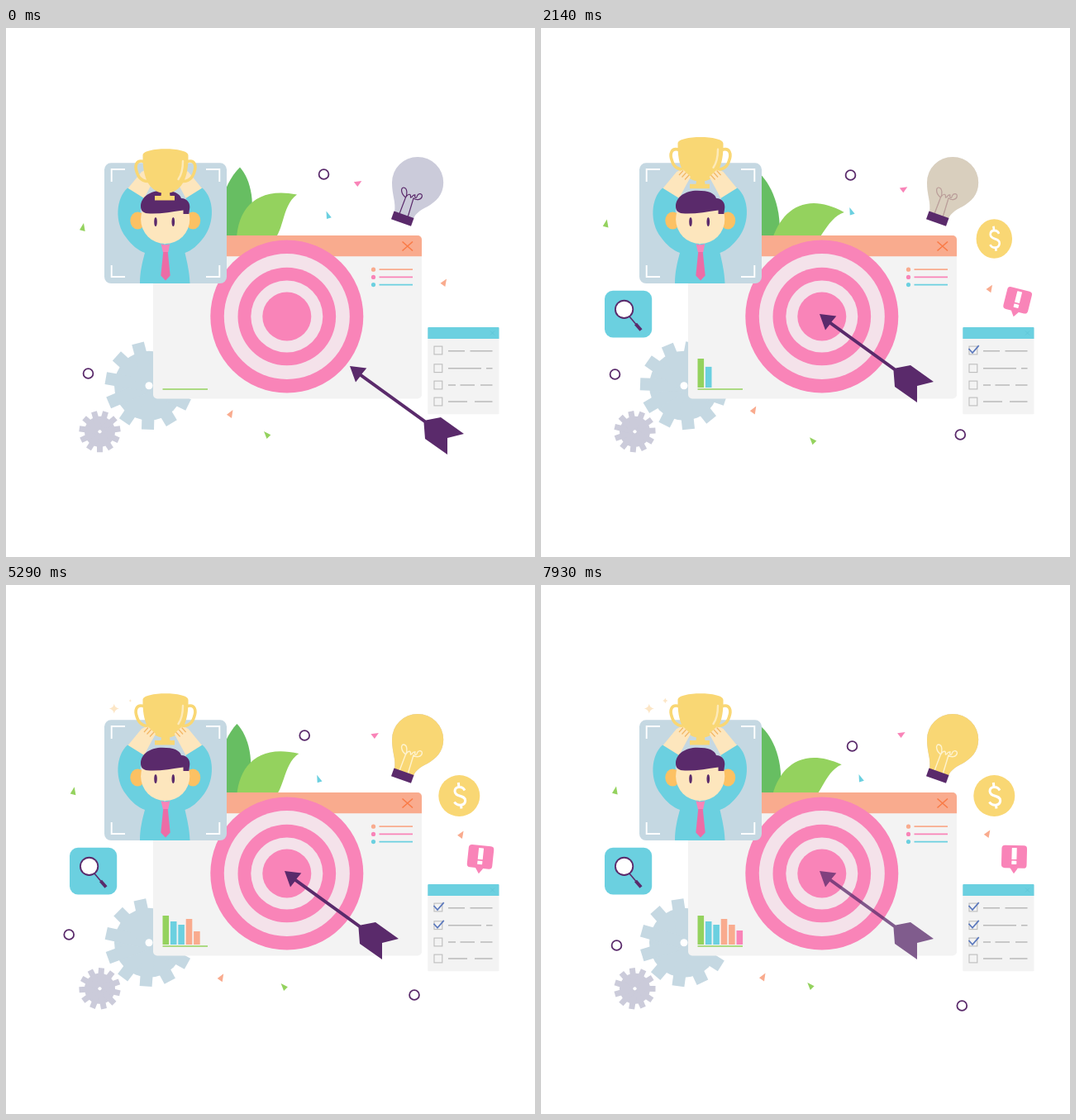
Write an HTML page with a canvas that moves like this. It is 640 px wide and 640 px high and loops after 8 s.

```html
<!DOCTYPE html>
<html lang="en">
<head>
<meta charset="utf-8">
<title>Goal achieved</title>
<style>
html, body { margin: 0; width: 100%; height: 100%; overflow: hidden; background: #fff; }
canvas { display: block; width: 100%; height: 100%; }
</style>
</head>
<body>
<canvas id="stage"></canvas>
<script>
const LOOP = 8000, TAU = Math.PI * 2, DEG = Math.PI / 180;
const PURPLE = '#5a2a6b', PINK = '#f984b8', CYAN = '#6bd0e0', ORANGE = '#f9ab8e',
      GREEN = '#94d25e', LEAF = '#67be62', YELLOW = '#f9d774', SKIN = '#fde6bd',
      STEEL = '#c5d8e2', LILAC = '#cbcbda', PAPER = '#f3f3f3';
const canvas = document.getElementById('stage');
const ctx = canvas.getContext('2d');

// ---- time helpers (seconds) ----
const clamp = v => Math.max(0, Math.min(1, v));
const ramp = (t, a, b) => clamp((t - a) / (b - a));
const ease = p => p * p * (3 - 2 * p);

// Smooth curve through values at the given times
function track(t, times, vals) {
  const last = times.length - 1;
  if (t <= times[0]) return vals[0];
  if (t >= times[last]) return vals[last];
  let i = 0;
  while (t > times[i + 1]) i++;
  const slope = k => {
    const a = Math.max(0, k - 1), b = Math.min(last, k + 1);
    return (vals[b] - vals[a]) / (times[b] - times[a]);
  };
  const d = times[i + 1] - times[i], p = (t - times[i]) / d, q = 1 - p;
  return vals[i] * (1 + 2 * p) * q * q + slope(i) * d * p * q * q
       + vals[i + 1] * p * p * (3 - 2 * p) - slope(i + 1) * d * p * p * q;
}

// ---- drawing helpers ----
function fill(d, color) {
  ctx.fillStyle = color;
  ctx.fill(new Path2D(d));
}
function stroke(d, color, width, cap = 'butt') {
  ctx.strokeStyle = color;
  ctx.lineWidth = width;
  ctx.lineCap = cap;
  ctx.stroke(new Path2D(d));
}
function ellipse(x, y, rx, ry, color) {
  ctx.fillStyle = color;
  ctx.beginPath();
  ctx.ellipse(x, y, rx, ry, 0, 0, TAU);
  ctx.fill();
}
const disc = (x, y, r, color) => ellipse(x, y, r, r, color);
function box(x, y, w, h, r, color) {
  ctx.fillStyle = color;
  ctx.beginPath();
  ctx.roundRect(x, y, w, h, r);
  ctx.fill();
}
// Draw in a frame turned and scaled about (x, y)
function about(x, y, deg, sx, sy, draw) {
  ctx.save();
  ctx.translate(x, y);
  ctx.rotate(deg * DEG);
  ctx.scale(sx, sy);
  ctx.translate(-x, -y);
  draw();
  ctx.restore();
}
function moved(dx, dy, draw) {
  ctx.save();
  ctx.translate(dx, dy);
  draw();
  ctx.restore();
}
function faded(alpha, draw) {
  if (alpha <= 0) return;
  ctx.save();
  ctx.globalAlpha = alpha;
  draw();
  ctx.restore();
}
function mirrored(axis, draw) {
  draw();
  about(axis, 0, 0, -1, 1, draw);
}

// ---- scene parts ----
function gear(x, y, body, outer, tooth, hub, deg, color) {
  disc(x, y, body, color);
  for (let i = 0; i < 11; i++) {
    about(x, y, deg + i * 360 / 11, 1, 1, () => box(x - tooth / 2, y - outer, tooth, outer, 0, color));
  }
  disc(x, y, hub, '#fff');
}

function gears(t) {
  const turn = 2.1 * t + 0.68 * t * t;
  gear(173, 432.7, 42, 53, 15, 4.5, 18 - turn, STEEL);
  gear(113.5, 488.3, 18.5, 25, 7, 2.1, 16.4 + turn * 0.7, LILAC);
}

function leaves(t) {
  const sway = 9 * (1 - Math.cos(TAU * t / 4.74));
  about(270, 258, -sway, 1, 1, () =>
    fill('M283 168.5C296 183 304 214 292 251L283 268L262 262C252 235 260 191 283 168.5Z', LEAF));
  about(290, 260, sway, 1, 1, () =>
    fill('M279 262C278 222 300 191 352 201.5C332 216 338 250 318 262Z', GREEN));
}

const BARS = [[400, GREEN], [407, CYAN], [411, CYAN], [404, ORANGE], [411, ORANGE], [418, PINK]];

function browser(t) {
  box(178, 251, 325, 197.5, 5, PAPER);
  box(178, 251, 325, 25.3, [5, 5, 0, 0], ORANGE);
  stroke('M479.5 258.5L492 269.5M492 258.5L479.5 269.5', '#f97b47', 1.6);
  [ORANGE, PINK, CYAN].forEach((c, i) => {
    const y = 292.2 + i * 9.2;
    disc(444.5, y, 2.6, c);
    stroke(`M451.5 ${y}H492`, c, 1.8);
  });
  BARS.forEach(([top, color], i) => {
    const start = 0.4 + 1.1 * i;
    const h = (435 - top) * ease(ramp(t, start, start + 0.8));
    box(189.5 + i * 9.4, 435 - h, 7.6, h, 0, color);
  });
  stroke('M189.5 437H244', GREEN, 1.7);
}

function target() {
  [92.5, 76, 59.3, 43.5, 29.5].forEach((r, i) => disc(339.8, 349, r, i % 2 ? '#f4e2ea' : PINK));
}

function arrow(t) {
  const p = ramp(t, 0, 0.45), left = 1 - p * p;
  faded(1 - 0.25 * ramp(t, 7.78, 7.93), () => moved(79 * left, 63 * left, () => {
    fill('M337 346L357.3 348.6L351.5 355.6L429 411.5L447 408L475 428L455 433V453L428 434L426.5 414.5L349.3 358.7L344 365.5Z', PURPLE);
  }));
}

function trophy() {
  mirrored(193, () =>
    stroke('M168 147C157 143 155.5 152 158.5 160C161.5 170 170 171.5 175 170', YELLOW, 3.6));
  fill('M165.5 139C166 128.8 220 128.8 220.5 139C221 166 213 181 198 184.5L198.5 188H204V193.5H180V188H187.5L188 184.5C173 181 165 166 165.5 139Z', YELLOW);
  stroke('M214 146C214 156 212 163 208.5 168', '#fdeab9', 2.4, 'round');
}

function portrait(t) {
  box(119, 163.3, 148, 145.7, 8, STEEL);
  mirrored(193, () => stroke('M127.7 186V171H144M127.7 287V301H144', '#fff', 1.9));
  mirrored(192.3, () => fill('M147.5 194L164 174L172 170L181 180L167 206Z', SKIN));
  fill('M147 193.5C133 206 131 235 145 253C152 263 160 269 168 272C165 283 162 295 162 309H222.5C222 295 219 283 216.5 272C225 269 232 263 239.5 253C253 235 252 206 237.5 193.5L217.5 206C222 215 222 222 222 232L192 262L163 232C162 222 163 214 167 206Z', CYAN);
  ellipse(159.3, 233, 9, 10.5, '#fcc163');
  ellipse(226.2, 233, 9, 10.5, '#fcc163');
  ellipse(192.7, 231.5, 29.6, 29.6, SKIN);
  fill('M163 216C163 204 175 196.8 189 196.8C203 196.8 210 200 212 206C219 206.5 222.5 211 222.3 217L221.3 225H214.5V220.5C200 222.5 184 225.5 171 224.3C165.5 223.5 163 220.5 163 216Z', PURPLE);
  ellipse(181, 234.5, 1.8, 5.6, PURPLE);
  ellipse(202.3, 234.5, 1.8, 5.6, PURPLE);
  fill('M187.5 261.3Q193 263 198.3 261.3L196.3 271H189.8Z', PINK);
  fill('M190.2 271H195.8L198.7 299.5L193 305.5L187.3 299.5Z', '#ec6ca6');

  const drop = track(t, [0, 0.86, 1.21, 1.71, 2.14, 2.57], [15, 10, 7, 3, 0.7, 0]);
  moved(0, drop, trophy);
  faded(ramp(t, 0.9, 1.8), () => mirrored(192.3, () => {
    fill('M160 186L166 174L172 171.5L181 180L176 188Z', SKIN);
    stroke('M167 178L172 172.5M170.5 180.5L175.5 175M174 183.5L179 178', '#f3b765', 1.2);
  }));
}

function star(x, y, r) {
  if (r < 0.3) return;
  const k = r * 0.18;
  fill(`M${x} ${y - r}Q${x + k} ${y - k} ${x + r} ${y}Q${x + k} ${y + k} ${x} ${y + r}Q${x - k} ${y + k} ${x - r} ${y}Q${x - k} ${y - k} ${x} ${y - r}Z`, '#fce6c6');
}
function sparkles(t) {
  const pulse = (peak, start) => t < start ? 0 : 0.5 + 0.5 * Math.cos(TAU * (t - peak) / 2.42);
  star(130.8, 149.6, 6 * pulse(5.4, 4.19));
  star(150.3, 140, 5 * pulse(6, 2.37));
  star(244.6, 153, 6 * pulse(6.75, 3.12) ** 2);
}

function bulb(t) {
  const on = ramp(t, 2, 2.5);
  const glass = 'M470 223C472 210 467 203 467 187A31 31 0 0 1 529.2 187C529.2 202 520 210 510 216C500 221 495 225 493 231Z';
  const wire = 'M475.5 226L483.5 205C478 201 477 193.5 481 193C486 193.5 485.5 202 483.5 205C487 200 490 200 489.5 205C491 206 492 201 495 202C493.5 206 497 206.5 497.5 203C499 199.5 504 200 503.3 204C502 208.5 496 208.5 493 206L486 229';
  fill(glass, LILAC);
  faded(1 - on, () => stroke(wire, PURPLE, 1.2));
  faded(on, () => {
    fill(glass, YELLOW);
    stroke(wire, '#fef3cf', 1.4);
  });
  fill('M469.5 221.5L493.5 230L490 239.7L466 231.3Z', PURPLE);

  const grow = ease(ramp(t, 2.5, 2.8)), gone = ease(ramp(t, 3.9, 4.2));
  if (grow > gone) {
    [[478, 152.5, 472, 141.5], [505.2, 148.5, 505.8, 135.5], [528, 158, 539, 149.5], [537, 178, 551, 175.8]]
      .forEach(([x, y, u, v]) => {
        const at = p => `${x + (u - x) * p} ${y + (v - y) * p}`;
        stroke(`M${at(gone)}L${at(grow)}`, PURPLE, 2.5);
      });
  }
}

function coin(t) {
  const size = track(t, [0.95, 1.21, 2.14, 2.5], [0, 0.5, 0.95, 1]);
  if (size <= 0) return;
  const spin = track(t, [1, 1.21, 2.14, 3.21, 4.1], [-10, 20, 156, 292, 360]);
  const face = Math.max(0.04, Math.abs(Math.cos(spin * DEG)));
  about(548.3, 255, 0, size * face, size, () => {
    disc(548.3, 255, 25, YELLOW);
    stroke('M555 248.5C552 242.5 543 243.5 543 249.5C543 257 556 253.5 555.7 261C555 268 545.5 267.5 542.5 262.5M547.3 239L548 244.5M550.3 265.5L551 270.5', '#fff', 3);
  });
}

function searchTile(t) {
  const s = track(t, [0.95, 1.21, 1.72, 1.8], [0, 0.4, 0.98, 1]);
  if (s <= 0) return;
  about(105.5, 346, 0, s, s, () => {
    box(77, 317.7, 57.2, 56.8, 10, CYAN);
    stroke('M106.5 348.5L115 358.5', PURPLE, 1.6);
    stroke('M114.5 358L121 365.5', PURPLE, 4);
    disc(100.6, 340.4, 11.6, PURPLE);
    disc(100.6, 340.4, 9.7, '#fff');
  });
}

function alertBubble(t) {
  const s = ease(ramp(t, 0.45, 0.9));
  if (s <= 0) return;
  about(572, 348, 5 + 9.5 * Math.cos(TAU * (t - 2.27) / 2.45), s, s, () => {
    box(556.7, 315, 30.6, 27.5, 4, PINK);
    fill('M567 342H577L572 349.3Z', PINK);
    box(569, 318, 6, 14, 0.5, '#fff');
    box(569, 333.6, 6, 4.4, 0.5, '#fff');
  });
}

const ROWS = [
  [390, 'M535 390.8H555M561.5 390.8H588.5'],
  [411.7, 'M535 411.8H575M581 411.8H588.5'],
  [432, 'M535 432H544M549.5 432H567M574 432H588.5'],
  [452, 'M535 452H558M567 452H588.5']
];
function checklist(t) {
  box(510.3, 362, 86.2, 105.3, 1, PAPER);
  box(510.3, 362, 86.2, 14, [1, 1, 0, 0], CYAN);
  stroke('M586 366.5L591 371.5M591 366.5L586 371.5', '#5cc3d5', 0.8);
  ROWS.forEach(([y, lines], i) => {
    ctx.strokeStyle = '#bdbdbd';
    ctx.lineWidth = 1.1;
    ctx.strokeRect(518, y - 4.9, 9.8, 9.8);
    stroke(lines, '#bababa', 1.6);
    const p = ramp(t, [1, 3.1, 5.3, 9][i], [1.5, 3.6, 5.8, 10][i]);
    if (p > 0) {
      ctx.setLineDash([18.5 * p, 40]);
      stroke(`M517.5 ${y - 2}L522 ${y + 3}L530.3 ${y - 6.5}`, '#5b78bd', 1.7);
      ctx.setLineDash([]);
    }
  });
}

// Drift paths shared by the loose confetti
const TIMES = [0, 1.21, 2.14, 3.21, 5.29, 7.07, 7.93];
const DRIFT = {
  ring: [[0, -4, -10, -18, -23.3, -14.3, -8], [0, 0.3, 1, 2, 5, 13.5, 18]],
  west: [[0, -6.7, -14.2, -18, -11.3, -6.2, -3], [0, -2.2, -4.5, -4, 8.2, 11.5, 7.5]],
  east: [[0, 6, 13, 16.6, 20.6, 17.7, 10.3], [0, 3.5, 7.2, 7.4, -6, -11, -7]]
};
const CHIPS = [
  ['west', 'M94 236L95.7 246L89 244.2Z', GREEN],
  ['west', 'M387.5 221.5L393.8 229.3L388 231Z', CYAN],
  ['west', 'M274.5 462L273 472L267 467.8Z', ORANGE],
  ['east', 'M312 488L320.3 492.3L315.5 497Z', GREEN],
  ['east', 'M420.8 186.2L430.3 185L425.3 192Z', PINK],
  ['east', 'M533 303.5L531.3 313L525.5 308.7Z', ORANGE]
];
function confetti(t) {
  const drift = (name, draw) => {
    const [xs, ys] = DRIFT[name];
    moved(track(t, TIMES, xs), track(t, TIMES, ys), draw);
  };
  CHIPS.forEach(([path, shape, color]) => drift(path, () => fill(shape, color)));
  drift('ring', () => [[384.5, 177, 1], [99.5, 418, 1], [517.3, 491, ramp(t, 0.3, 0.8)]]
    .forEach(([x, y, a]) => faded(a, () => {
      ctx.strokeStyle = PURPLE;
      ctx.lineWidth = 1.8;
      ctx.beginPath();
      ctx.arc(x, y, 5.9, 0, TAU);
      ctx.stroke();
    })));
}

function render(t) {
  ctx.setTransform(canvas.width / 640, 0, 0, canvas.height / 640, 0, 0);
  ctx.fillStyle = '#fff';
  ctx.fillRect(0, 0, 640, 640);
  gears(t);
  leaves(t);
  browser(t);
  target();
  portrait(t);
  sparkles(t);
  bulb(t);
  coin(t);
  searchTile(t);
  checklist(t);
  alertBubble(t);
  confetti(t);
  arrow(t);
}

function resize() {
  const ratio = window.devicePixelRatio || 1;
  canvas.width = Math.round(innerWidth * ratio);
  canvas.height = Math.round(innerHeight * ratio);
}
addEventListener('resize', resize);
resize();

const began = performance.now();
function tick() {
  render(((performance.now() - began) % LOOP) / 1000);
  requestAnimationFrame(tick);
}
tick();
</script>
</body>
</html>
```
